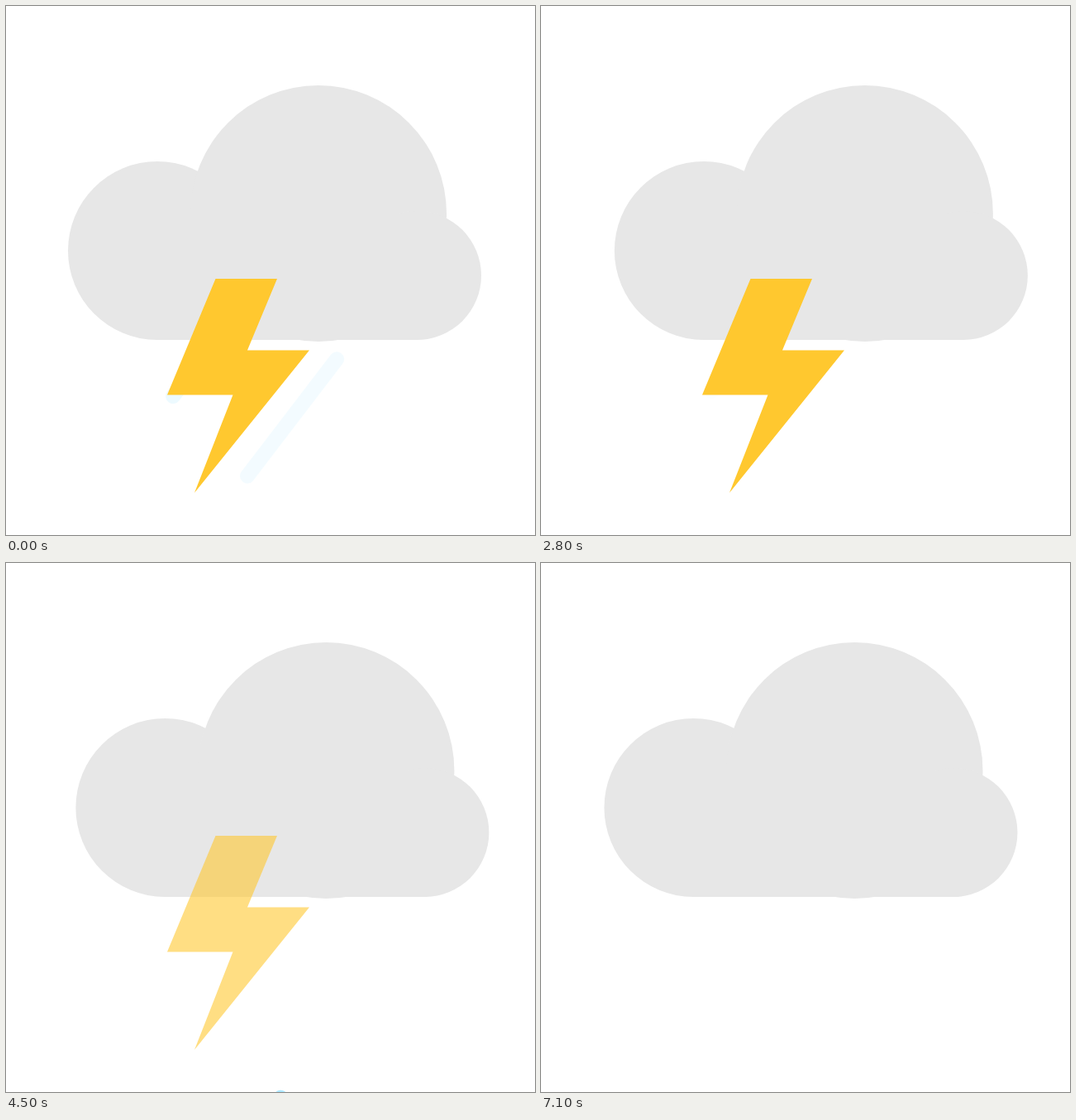
An HTML page for the animation above (7.2 s loop, 640 by 640 pixels).

```html
<!DOCTYPE html>
<html lang="en">
<head>
<meta charset="utf-8">
<title>Thunderstorm</title>
<style>
  html, body { margin: 0; width: 100%; height: 100%; overflow: hidden; background: #fff; }
  svg { display: block; width: 100vw; height: 100vh; }
  #cloud { fill: #e7e7e7; }
  #rain { stroke: #ade8ff; stroke-width: 18; stroke-linecap: round; }
  #bolt { fill: #ffc82f; }
</style>
</head>
<body>
<svg viewBox="0 0 640 640">
  <g id="cloud">
    <circle cx="183" cy="296" r="108"/>
    <circle cx="378" cy="251" r="155"/>
    <circle cx="497" cy="326" r="78"/>
    <rect x="183" y="251" width="314" height="153"/>
  </g>
  <g id="rain"></g>
  <polygon id="bolt" points="253.5,330 328,330 292,416.5 367,416.5 228,589 274.5,470.5 195,470.5"/>
</svg>
<script>
const LOOP = 7200, STEP = 100, DRIFT = 1800;
const STRIKES = [0, 2835, 5135, LOOP];
const LEAD = 60; // the bolt shows slightly before the rain

// Slanted coordinates: "lane" runs across the rain, "along" down its slope.
const DX = -0.608, DY = 0.794;

// path and fade hold [time, value] pairs, counted from the strike
const drops = [
  { lane: 577.5, len: 178, path: [[-60, 87], [0, 96], [365, 154], [965, 351], [1265, 450]], fade: [[-25, 0], [165, 1]] },
  { lane: 447.5, len: 21, path: [[-60, 218], [365, 310], [965, 439]], fade: [[-40, 0], [150, 1], [800, 1], [920, 0]] },
  { lane: 618, len: 128, path: [[285, 78], [365, 101], [965, 276], [1565, 450]], fade: [[285, 0], [485, 1]] },
  { lane: 493.5, len: 58, path: [[500, 221], [1300, 397]], fade: [[500, 0], [700, 1], [1060, 1], [1235, 0]] },
  { lane: 657, len: 58, path: [[650, 89], [965, 158], [1165, 202], [1800, 341]], fade: [[650, 0], [850, 1]] }
];
const flash = [[500, 1], [632, 0], [1298, 1], [1550, 1], [1585, 0.96], [1600, 0.93], [1780, 0]];

const cloud = document.getElementById("cloud");
const rain = document.getElementById("rain");
const bolt = document.getElementById("bolt");

for (const drop of drops) {
  drop.line = document.createElementNS("http://www.w3.org/2000/svg", "line");
  rain.append(drop.line);
}

function track(keys, t) {
  if (t <= keys[0][0]) return keys[0][1];
  for (let i = 1; i < keys.length; i++) {
    const [t0, v0] = keys[i - 1], [t1, v1] = keys[i];
    if (t < t1) return v0 + (v1 - v0) * (t - t0) / (t1 - t0);
  }
  return keys[keys.length - 1][1];
}

function place(line, end, lane, along) {
  line.setAttribute("x" + end, DY * lane + DX * along);
  line.setAttribute("y" + end, DY * along - DX * lane);
}

function draw(t) {
  const u = (t % DRIFT) / DRIFT;
  const ease = u * u * (2 - u);
  const shift = 25 * (t % (2 * DRIFT) < DRIFT ? ease : 1 - ease);
  cloud.setAttribute("transform", `translate(${shift} 0)`);

  const start = STRIKES.filter(s => s - LEAD <= t).pop();
  const age = t - start;
  bolt.setAttribute("opacity", track(flash, age));

  for (const { line, lane, len, path, fade } of drops) {
    const top = track(path, age);
    place(line, 1, lane, top);
    place(line, 2, lane, top + len);
    const done = age >= path[path.length - 1][0];
    line.setAttribute("opacity", done ? 0 : track(fade, age));
  }
}

let begin;
function tick(now) {
  begin ??= now;
  draw(Math.floor((now - begin) % LOOP / STEP) * STEP);
  requestAnimationFrame(tick);
}
draw(0);
requestAnimationFrame(tick);
</script>
</body>
</html>
```
